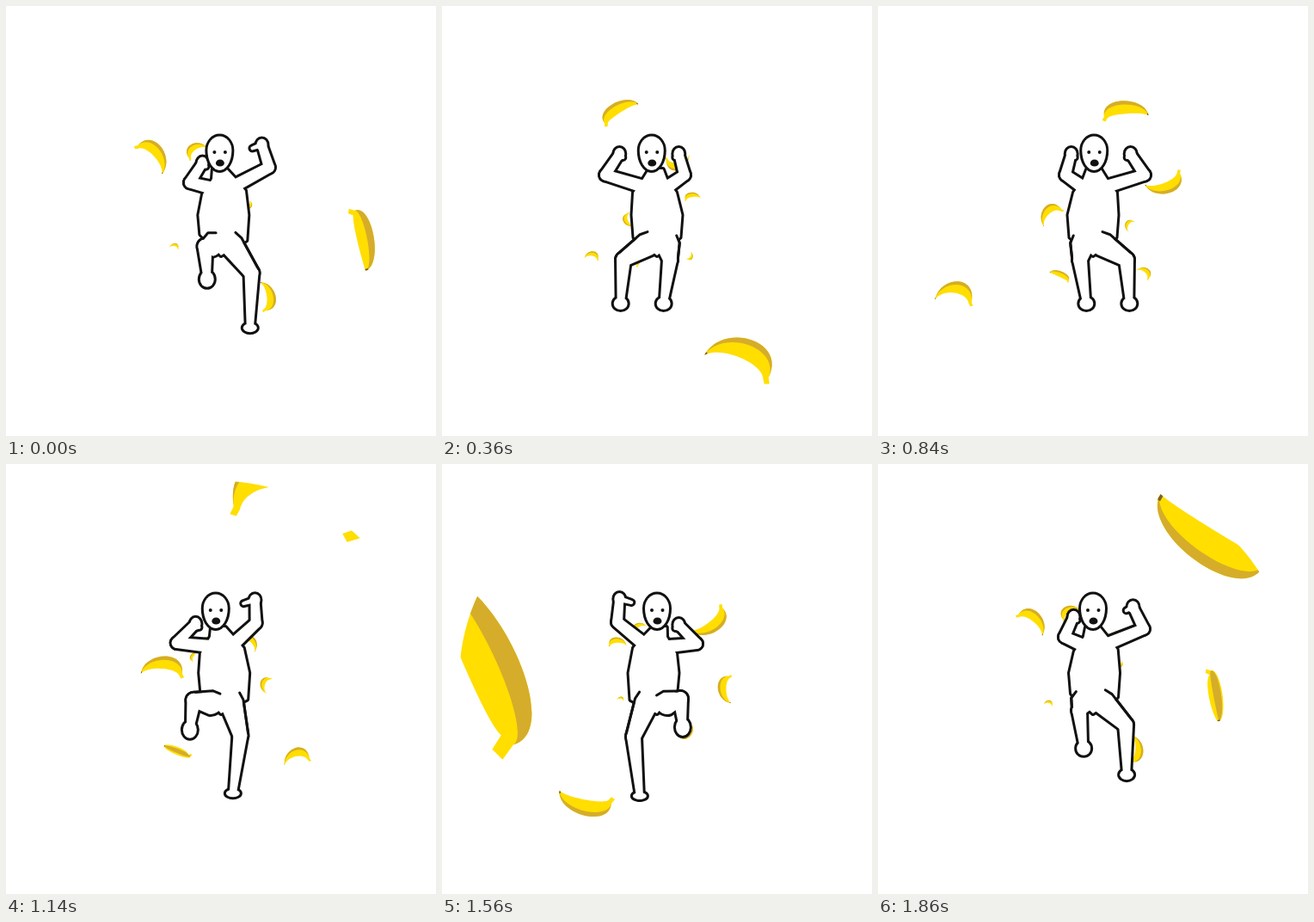
An HTML page with a canvas that plays this animation: 500x500 px, repeating every 1.92 s.

```html
<!DOCTYPE html>
<html>
<head>
<meta charset="utf-8">
<style>
html, body { margin: 0; width: 100%; height: 100%; overflow: hidden; background: #fff; }
canvas { display: block; }
</style>
</head>
<body>
<canvas id="stage" width="500" height="500"></canvas>
<script>
const ctx = document.getElementById('stage').getContext('2d');
const FRAME = 60, COUNT = 32, STEP = 16, MID = 250, REACH = 230;
const INK = '#111', LINE = 3;
const clamp = (v, lo, hi) => Math.min(hi, Math.max(lo, v));
const rad = deg => deg * Math.PI / 180;

// A circle at each end, joined
function bone([x0, y0], r0, [x1, y1], r1) {
  const p = new Path2D(), a = Math.atan2(y1 - y0, x1 - x0), q = Math.PI / 2;
  p.arc(x0, y0, r0, a + q, a + 3 * q);
  p.arc(x1, y1, r1, a - q, a + q);
  p.closePath();
  return p;
}

function oval(x, y, rx, top, bottom = top) {
  const p = new Path2D();
  p.ellipse(x, y, rx, top, 0, Math.PI, 2 * Math.PI);
  p.ellipse(x, y, rx, bottom, 0, 0, Math.PI);
  p.closePath();
  return p;
}

// Every joint swings as one cosine per dance step: mean, amplitude, time of the peak
const swing = t => (mean, amp, peak) => mean + amp * Math.cos(2 * Math.PI * (t - peak) / STEP);

// The body's left half; the right half is its mirror image, half a step later
function halfBody(t) {
  const w = swing(t);
  const armpit = [w(225.5, 3.5, 0), w(217, 3, 2)];
  const waist = [w(221.5, 4, 2), 243];
  const side = [w(223.5, 4, 2), w(269, 5, 10)];
  const neck = [w(242, 3, 11), 190];
  const shoulder = [armpit[0] + 8, armpit[1] - 8];
  const elbow = [w(204, 14, 14), w(196.5, 12.5, 2)];
  const hand = [w(215.5, 13, 0), w(172, 15, 2)];
  const open = Math.max(0, w(0, 1, 10));
  const thumb = [hand[0] + 4 + 10 * open, hand[1] + 4];
  const hip = [238, 278];
  const knee = [w(223, 12, 14), w(295, 22, 10)];
  const foot = [w(225, 18, 13.3), w(346, 40, 10)];

  // Upper edge of the thigh, running into the belly
  const a = Math.atan2(knee[1] - hip[1], knee[0] - hip[0]);
  const edge = ([x, y], r, back) => [x - r * Math.sin(a) - back * Math.cos(a), y + r * Math.cos(a) - back * Math.sin(a)];
  const crease = new Path2D();
  crease.moveTo(...edge(knee, 8 + LINE / 2, 0));
  crease.lineTo(...edge(hip, 13 + LINE / 2, 0));
  crease.lineTo(...edge(hip, 11 + LINE / 2, 9));

  return {
    outline: [neck, [armpit[0] + 11, 201], armpit, waist, side],
    crease,
    parts: [
      bone(shoulder, 7, elbow, 6), bone(elbow, 6, hand, 5),
      oval(...hand, 6, 7), bone(hand, 3, thumb, 2),
      bone(hip, 13, knee, 8), bone(knee, 8, foot, 4),
      oval(...foot, 8, w(7, 3, 2))
    ]
  };
}

function drawDancer(t) {
  const left = halfBody(t), right = halfBody(t + STEP / 2);
  const mirror = path => {
    const p = new Path2D();
    p.addPath(path, new DOMMatrix([-1, 0, 0, 1, 2 * MID, 0]));
    return p;
  };
  const torso = new Path2D();
  const rightEdge = right.outline.map(([x, y]) => [2 * MID - x, y]).reverse();
  for (const point of [...left.outline, [MID, 290], ...rightEdge]) torso.lineTo(...point);
  torso.closePath();

  const head = swing(t)(247.5, 4.5, 12.5);
  const parts = [torso, ...left.parts, ...right.parts.map(mirror)];
  const face = oval(head, 168, 14, 16.5, 23);
  ctx.strokeStyle = INK;
  ctx.lineCap = ctx.lineJoin = 'round';
  for (const group of [parts, [face]]) {
    ctx.lineWidth = 2 * LINE;
    for (const p of group) ctx.stroke(p);
    ctx.fillStyle = '#fff';
    for (const p of group) ctx.fill(p);
  }
  ctx.lineWidth = LINE;
  ctx.stroke(left.crease);
  ctx.stroke(mirror(right.crease));
  ctx.fillStyle = INK;
  for (const dx of [-6, 6.5]) ctx.fill(oval(head + dx, 170, 2, 2));
  ctx.fill(oval(head + .5, 183, 5, 4.5, 3.5));
}

// One sighting of each banana and how it moves on:
// frame, x, y, length, angle, bend, approach, spin, roll
const bananas = [
  [32, 166, 179, 45, -135, -.3, 125, 8, 0],
  [10, 182, 47, 88, 146, .15, 75, 0, .085],
  [14, 88, 344, 44, 9, .4, 75, 0, 0],
  [32, 410, 272, 73, -105, -.1, 90, -2.5, -.065],
  [6, 343, 421, 81, 24, .29, 80, -10, 0],
  [14, 331, 200, 44, -22, -.27, 126, -24, 0],
  [14, 288, 129, 53, 174, -.2, 62, 0, -.08],
  [26, 31, 234, 224, 68, .1, 143, 9, -.025],
  [31, 392, 75, 150, 30, -.14, 130, 14, .024],
  [26, 168, 386, 64, 9, -.2, 57, -1.5, -.028],
  [19, 339, 347, 31, -10, .4, 83, -10, 0]
];

function drawBanana([t0, x, y, length, angle, bend, approach, spin, roll], frame) {
  const age = (frame - t0 + 24 + COUNT) % COUNT - 24;
  const r0 = Math.hypot(x - MID, y - MID);
  const depth = 1 / r0 - approach * 1e-5 * age;
  if (depth < 1 / 260) return;
  const zoom = 1 / (depth * r0), size = length * zoom ** 1.3;
  const curve = clamp(bend + roll * age, -.38, .38);
  ctx.save();
  ctx.translate(MID + (x - MID) * zoom, MID + (y - MID) * zoom);
  ctx.rotate(rad(angle + spin * age));
  ctx.scale(size, curve < 0 ? -size : size);
  ctx.translate(-.5, 0);
  peel(Math.abs(curve), .25);
  ctx.restore();
}

// Unit banana: tip at 0,0 and stem at 1,0, arching upwards
function peel(bend, width) {
  const outer = bend + width / 2, inner = bend - width / 2;
  ctx.beginPath();
  ctx.moveTo(0, -.02);
  ctx.bezierCurveTo(.1, -1.3 * outer, 1, -1.55 * outer, .97, -.06);
  ctx.lineTo(1.02, .02);
  ctx.lineTo(.95, .05);
  ctx.lineTo(.9, -.02);
  ctx.bezierCurveTo(.8, -1.3 * inner, .15, -1.2 * inner, 0, .02);
  ctx.fillStyle = '#ffde00';
  ctx.fill();
  ctx.clip();

  // The shaded ridge moves to the outer edge as the bend shows
  const ridge = bend + width * .5 * Math.min(1, bend / .13);
  const hi = ridge + width * .28, lo = ridge - width * .28;
  ctx.beginPath();
  ctx.moveTo(0, 0);
  ctx.bezierCurveTo(.1, -1.3 * hi, 1, -1.55 * hi, .97, -.06);
  ctx.bezierCurveTo(.95, -1.5 * lo, .12, -1.3 * lo, 0, 0);
  ctx.fillStyle = '#d5ad2a';
  ctx.fill();
  ctx.fillStyle = '#7d6126';
  ctx.fillRect(-.01, -.03, .035, .06);
}

function draw(now) {
  const frame = Math.floor(now / FRAME) % COUNT;
  ctx.fillStyle = '#fff';
  ctx.fillRect(0, 0, 500, 500);
  ctx.save();
  ctx.clip(oval(MID, MID, REACH, REACH));
  for (const b of bananas) drawBanana(b, frame);
  ctx.restore();
  drawDancer(frame % STEP);
}

let start;
function tick(now) {
  start ??= now;
  draw(now - start);
  requestAnimationFrame(tick);
}
requestAnimationFrame(tick);
</script>
</body>
</html>
```
